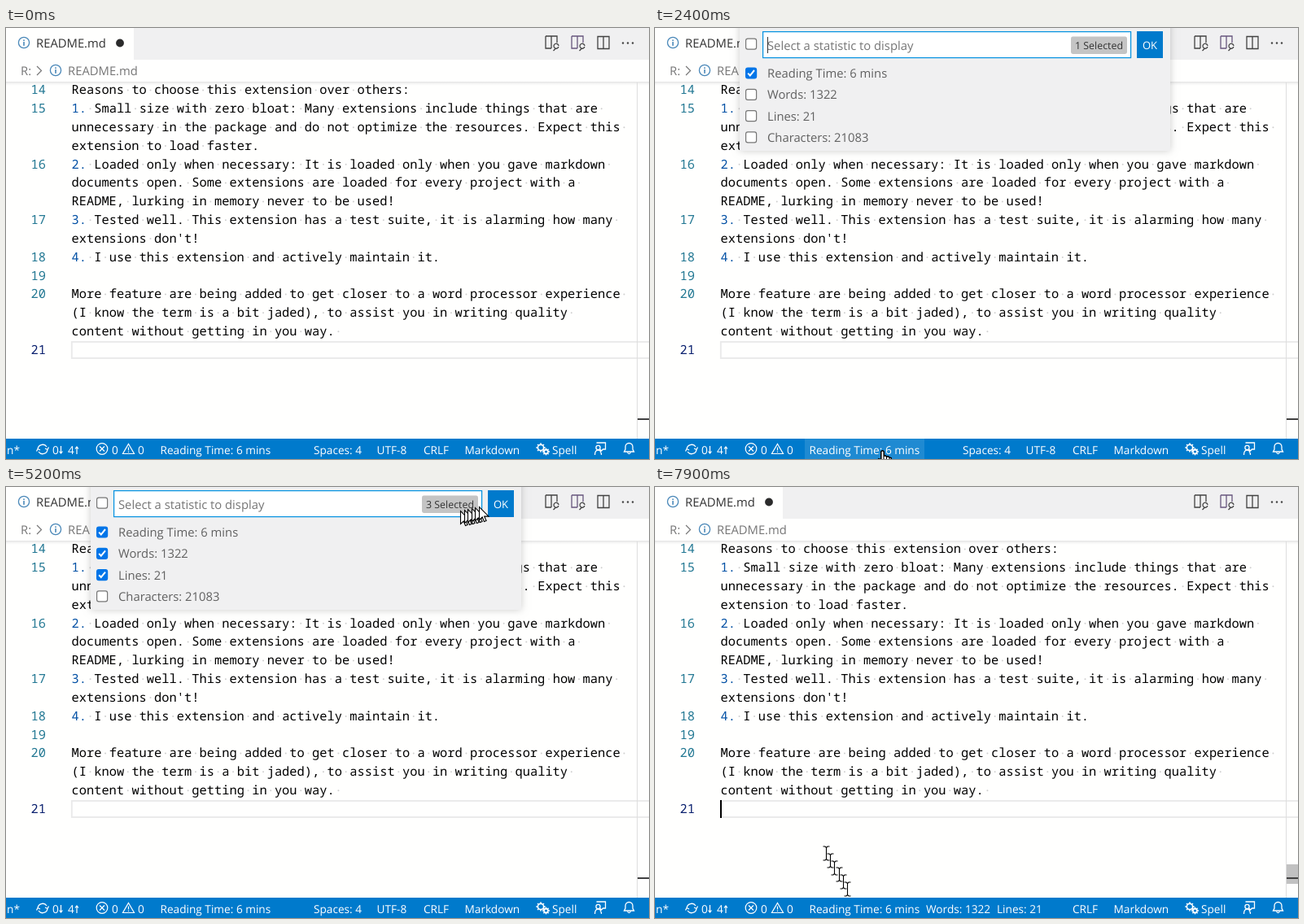
An HTML page with a canvas that plays this animation: 790 px wide and 530 px high, repeating every 8 s.

```html
<!DOCTYPE html>
<html lang="en">
<head>
<meta charset="utf-8">
<title>Reading statistics in the status bar</title>
<style>
html, body { margin: 0; width: 790px; height: 530px; overflow: hidden; background: #fff; }
canvas { display: block; }
</style>
</head>
<body>
<canvas id="stage" width="790" height="530"></canvas>
<script>
const ctx = document.getElementById('stage').getContext('2d');
ctx.textRendering = 'geometricPrecision';

const LOOP = 8000, STEP = 100;
const UI = '"Open Sans", "Noto Sans", sans-serif';
const MONO = '15.395px "Noto Sans Mono", "DejaVu Sans Mono", monospace';
const CHAR = 9.237, ROW = 22.82, LEFT = 80.5;
const MENU_OPEN = 2100, MENU_CLOSE = 5600, WORDS_CLICK = 4000, LINES_CLICK = 4600;

// [line number, text]; rows without a number continue a wrapped line
const LINES = [
  [14, 'Reasons to choose this extension over others:'],
  [15, '1. Small size with zero bloat: Many extensions include things that are '],
  ['', 'unnecessary in the package and do not optimize the resources. Expect this '],
  ['', 'extension to load faster.'],
  [16, '2. Loaded only when necessary: It is loaded only when you gave markdown '],
  ['', 'documents open. Some extensions are loaded for every project with a '],
  ['', 'README, lurking in memory never to be used!'],
  [17, '3. Tested well. This extension has a test suite, it is alarming how many '],
  ['', "extensions don't!"],
  [18, '4. I use this extension and actively maintain it.'],
  [19, ''],
  [20, 'More feature are being added to get closer to a word processor experience '],
  ['', '(I know the term is a bit jaded), to assist you in writing quality '],
  ['', 'content without getting in you way. '],
  [21, '']
];

// pointer path: time, x, y
const PATH = [
  [0, 262, -40], [800, 262, -40], [900, 265, 6], [1000, 267, 35], [1100, 271, 95],
  [1200, 276, 165], [1250, 283, 240], [1300, 288, 331], [1400, 288, 395], [1500, 286, 438],
  [1600, 284, 464], [1700, 282, 483], [1800, 280, 512], [1900, 279, 519], [2700, 279, 519],
  [2900, 274, 490], [3000, 262, 430], [3200, 215, 260], [3300, 185, 195], [3400, 165, 155],
  [3500, 154, 129], [3600, 158, 103], [3700, 160, 91], [3800, 162, 80], [4200, 162, 80],
  [4400, 158, 108], [4600, 158, 110], [4700, 175, 106], [4800, 240, 92], [5000, 450, 50],
  [5115, 558, 29], [5200, 581, 24], [5300, 593, 15], [5400, 596, 11], [6785, 596, 11],
  [6800, 590, 11], [7000, 510, 95], [7200, 380, 220], [7400, 260, 320], [7500, 224, 358],
  [7600, 206, 385], [7700, 203, 412], [7815, 210, 450], [7900, 236, 494], [8000, 250, 510]
];

const HAND = new Path2D('M-1.5 1.5Q0-.5 1.5 1.5V7Q4 6 5 8Q7.5 7 8.5 9Q11 8.5 11 11V15Q10.5 18 9 21H0Q-2 17-5.5 13Q-6.5 10.5-4 10.5Q-2.5 11.5-1.5 13ZM1.5 7V11M5 8V11.5M8.5 9V12');
const ARROW = new Path2D('M0 0V16L3.7 12.5L6 18L8.6 17L6.2 11.6H11.5Z');
const IBEAM = new Path2D('M-4-8.5H-1.5L0-7L1.5-8.5H4M0-7V7M-4 8.5H-1.5L0 7L1.5 8.5H4');

const clamp = v => Math.max(0, Math.min(1, v));
const menuShown = t => t >= MENU_OPEN && t < MENU_CLOSE;

function rect(x, y, w, h, color) {
  ctx.fillStyle = color;
  ctx.fillRect(x, y, w, h);
}

function label(text, x, y, size, color, align = 'left') {
  ctx.font = size + 'px ' + UI;
  ctx.textAlign = align;
  ctx.fillStyle = color;
  ctx.fillText(text, x, y);
}

function line(d, color, width = 1.2, x = 0, y = 0) {
  ctx.save();
  ctx.translate(x, y);
  ctx.strokeStyle = color;
  ctx.lineWidth = width;
  ctx.stroke(new Path2D(d));
  ctx.restore();
}

function circle(x, y, r, color, width) {
  ctx.beginPath();
  ctx.arc(x, y, r, 0, 2 * Math.PI);
  ctx.fillStyle = ctx.strokeStyle = color;
  if (width) { ctx.lineWidth = width; ctx.stroke(); } else ctx.fill();
}

function roundBox(x, y, w, h, r, fill, border) {
  ctx.beginPath();
  ctx.roundRect(x, y, w, h, r);
  ctx.fillStyle = fill;
  ctx.fill();
  if (border) { ctx.strokeStyle = border; ctx.lineWidth = 1.2; ctx.stroke(); }
}

function pointerAt(t) {
  const i = Math.max(1, PATH.findIndex(p => p[0] >= t));
  const [t0, x0, y0] = PATH[i - 1], [t1, x1, y1] = PATH[i];
  const k = clamp((t - t0) / (t1 - t0));
  return { x: x0 + (x1 - x0) * k, y: y0 + (y1 - y0) * k };
}

function infoIcon(x, y) {
  const color = '#4a88b8';
  circle(x, y, 6.6, color, 1.3);
  rect(x - .8, y - 1, 1.6, 4.8, color);
  rect(x - .8, y - 3.6, 1.6, 1.6, color);
}

function drawHeader() {
  rect(0, 0, 790, 39, '#f0f0f1');
  rect(0, 0, 157, 39, '#fffffe');
  infoIcon(22, 18);
  label('README.md', 37, 24, 14.8, '#333');
  circle(140, 18.5, 4.9, '#2b2b2b');
  label('R:', 18, 57.5, 14.8, '#767676');
  line('M0 0L5.5 5.5L0 11', '#767676', 1.2, 38, 47);
  infoIcon(61, 52);
  label('README.md', 76, 57.5, 14.8, '#767676');

  const pane = 'M0 0H14V8M7 0V15M0 0V15H7', lens = 'M13 11A3 3 0 1 0 12.9 12M9.5 14L6.5 17';
  line(pane, '#424242', 1.3, 663, 10);
  line(lens, '#424242', 1.3, 666, 11);
  line(pane, '#67567d', 1.3, 695, 10);
  line(lens, '#424242', 1.3, 698, 11);
  line('M0 0H14V15H0ZM7 0V15', '#424242', 1.3, 727, 10.5);
  for (const x of [758, 764, 770]) circle(x, 18.5, 1.2, '#424242');
}

function drawText() {
  const shade = ctx.createLinearGradient(0, 66, 0, 72);
  shade.addColorStop(0, '#e2e2e2');
  shade.addColorStop(1, '#ffffff00');
  rect(0, 66, 790, 6, shade);

  // outline of the current line
  ctx.strokeStyle = '#e9e9e9';
  ctx.lineWidth = 1.8;
  ctx.strokeRect(80.8, 386, 720, 20);

  LINES.forEach(([number, text], row) => {
    const base = 81.3 + row * ROW;
    ctx.font = MONO;
    ctx.textAlign = 'right';
    ctx.fillStyle = number === 21 ? '#0b216f' : '#237893';
    ctx.fillText(number, 49, base);
    ctx.textAlign = 'left';
    for (const { 0: word, index } of text.matchAll(/\S+/g)) {
      ctx.fillStyle = /^\d\.$/.test(word) ? '#0451a5' : '#000';
      ctx.fillText(word, LEFT + index * CHAR, base);
    }
    for (const { index } of text.matchAll(/ /g)) {
      circle(LEFT + (index + .5) * CHAR, base - 4.8, 1, '#cfcfcf');
    }
  });
}

function drawScrollbar(t) {
  rect(775, 67, 1, 438, '#dedede');
  const fade = t < 2500 ? (t >= 1000) * (1 - clamp((t - 1800) / 400))
    : t < 5000 ? (t >= 2900) * (1 - clamp((t - 3700) / 600))
    : +(t >= 7000);
  rect(776, 464, 14, 24, `rgba(100,100,100,${.4 * fade})`);
  rect(776, 480, 14, 2, '#414141');
}

function drawStatus(t, pointer) {
  const white = '#fff', base = 524, done = t >= MENU_CLOSE;
  const say = (text, x) => label(text, x, base, 13.65, white);
  rect(0, 505, 790, 25, '#007acc');
  if (pointer.y > 505 && pointer.x > 184 && pointer.x < 331) {
    rect(184, 505, 147, 25, 'rgba(255,255,255,.12)');
  }
  label('in*', 17, base, 13.65, white, 'right');
  line('M-6 0A6 6 0 0 1 5-3M6 0A6 6 0 0 1-5 3M7.5-2.5L6 .5L3-1M-7.5 2.5L-6-.5L-3 1', white, 1.3, 45, 518);
  say('0', 57);
  line('M0-5V4M-2 1.5L0 4L2 1.5', white, 1.2, 67.5, 519);
  say('4', 76);
  line('M0 5V-4M-2-1.5L0-4L2-1.5', white, 1.2, 87, 519);
  circle(118, 517.5, 6.8, white, 1.2);
  line('M-3-3L3 3M3-3L-3 3', white, 1.2, 118, 517.5);
  say('0', 130);
  line('M0-6L7 6H-7ZM0-2V2M0 3.2V4.5', white, 1.2, 150.5, 517.5);
  say('0', 162);
  say('Reading Time: 6 mins', 189.5);
  if (done) {
    say('Words: 1322', 333);
    say('Lines: 21', 420);
  } else {
    say('Spaces: 4', 378);
    say('UTF-8', 455.5);
  }
  say('CRLF', 513);
  say('Markdown', 563.5);
  for (const [x, y, r] of [[657, 516, 3.6], [663.5, 521, 2.4]]) {
    circle(x, y, r, white, 1.6);
    for (let a = 0; a < 8; a++) {
      circle(x + (r + 1.2) * Math.cos(a * Math.PI / 4), y + (r + 1.2) * Math.sin(a * Math.PI / 4), .9, white);
    }
  }
  say('Spell', 671);
  line('M-4-7H7V1H4L1 4V1M-6 8Q-6 2-2 2Q2 2 2 8', white, 1.3, 729.5, 517);
  circle(727.5, 516, 2.6, white, 1.3);
  line('M-6 4H6L4.5 1V-2A4.5 4.5 0 0 0-4.5-2V1ZM-2 5Q0 8 2 5', white, 1.3, 765.5, 517);
}

function checkbox(y, on) {
  roundBox(111.6, y - 6.4, 13, 13, 2.4, on ? '#0075e8' : '#fff', on ? '#0075e8' : '#767676');
  if (on) line('M-3.8 .2L-1.2 3L4-3.4', '#fff', 2, 118, y);
}

function drawMenu(t, pointer) {
  ctx.save();
  ctx.shadowColor = 'rgba(0,0,0,.2)';
  ctx.shadowBlur = 9;
  rect(104, -10, 529, 161, '#f0f0f1');
  ctx.restore();

  checkbox(19.5, false);
  rect(132, 4, 453, 33, '#fff');
  ctx.strokeStyle = '#0090e0';
  ctx.lineWidth = 1.2;
  ctx.strokeRect(132.6, 4.6, 452, 32);
  label('Select a statistic to display', 138, 27, 14.8, '#767676');
  const caretOff = (t >= 2600 && t < 3100) || (t >= 3700 && t < 4200) || (t >= 4700 && t < 5300);
  if (!caretOff) rect(138, 11, 1, 20, '#333');

  const count = 1 + (t >= WORDS_CLICK) + (t >= LINES_CLICK);
  roundBox(511, 10.5, 69, 21.5, 2.4, '#c4c4c4');
  label(count + ' Selected', 545.5, 25.5, 12.4, '#333', 'center');
  const overOk = pointer.x > 592 && pointer.y < 37;
  rect(592, 4, 32, 33, overOk ? '#0062a3' : '#007acc');
  label('OK', 608, 26, 13, '#fff', 'center');

  const rows = [
    ['Reading Time: 6 mins', true],
    ['Words: 1322', t >= WORDS_CLICK],
    ['Lines: 21', t >= LINES_CLICK],
    ['Characters: 21083', false]
  ];
  rows.forEach(([text, on], i) => {
    const y = 55.4 + i * 26.3;
    if (pointer.x > 104 && pointer.x < 633 && Math.abs(pointer.y - y) < 13.15) {
      rect(104, y - 13.2, 529, 26.4, '#e8e8ea');
    }
    checkbox(y, on);
    label(text, 138, y + 5.6, 14.8, '#616161');
  });
}

function pointerShape(t, { x, y }) {
  if (y > 505) return HAND;
  if (menuShown(t) && x > 104 && x < 633 && y < 151) {
    return y > 42 || x > 592 ? HAND : ARROW;
  }
  if (t >= MENU_CLOSE && t <= 6800) return HAND;
  return y > 67 ? IBEAM : ARROW;
}

function drawPointer(t) {
  for (let age = 85; age >= 0; age -= 17) {
    const when = Math.max(0, t - age), p = pointerAt(when), shape = pointerShape(when, p);
    ctx.save();
    ctx.translate(Math.round(p.x) + .5, Math.round(p.y) + .5);
    ctx.lineWidth = 1.1;
    ctx.strokeStyle = '#000';
    ctx.fillStyle = '#fff';
    if (shape !== IBEAM) ctx.fill(shape);
    ctx.stroke(shape);
    ctx.restore();
  }
}

function draw(t) {
  const pointer = pointerAt(t);
  rect(0, 0, 790, 530, '#fffffe');
  drawHeader();
  drawText();
  drawScrollbar(t);
  const caretOff = (t >= 6200 && t < 6800) || (t >= 7300 && t < 7800);
  if (t >= MENU_CLOSE && !caretOff) rect(80, 385, 2, 22, '#000');
  drawStatus(t, pointer);
  if (menuShown(t)) drawMenu(t, pointer);
  drawPointer(t);
}

const start = performance.now();
function tick() {
  const t = (performance.now() - start) % LOOP;
  draw(Math.floor(t / STEP) * STEP);
  requestAnimationFrame(tick);
}
tick();
</script>
</body>
</html>
```
